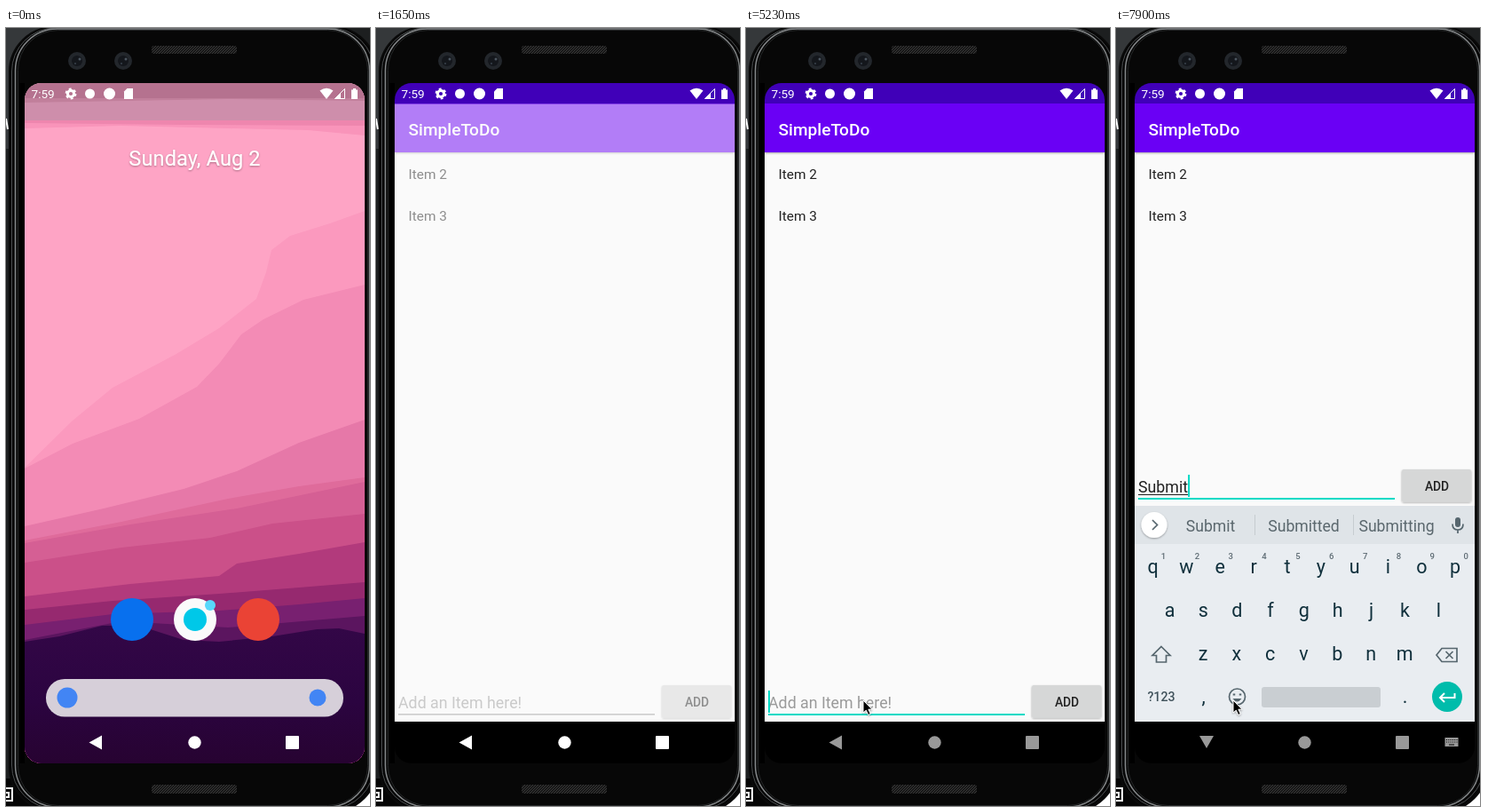
These frames come from a looping animation (410 px wide and 876 px high, 8 s). An HTML page:

```html
<!DOCTYPE html>
<html lang="en">
<head>
<meta charset="utf-8">
<title>To-do app demo</title>
<style>
  html, body { margin: 0; width: 100%; height: 100%; overflow: hidden; background: #000; }
  svg { display: block; width: 410px; height: 876px; }
  text { font-family: Roboto, sans-serif; }
  .mid { text-anchor: middle; }
  .key { font-size: 21.5px; fill: #10303c; }
  .num { font-size: 9.5px; fill: #5d6b73; font-weight: 500; }
  .item { font-size: 15.4px; fill: #212121; }
  .word { font-size: 17.6px; fill: #5a676d; }
  .field { font-size: 17.8px; }
  .line { fill: none; stroke: #56666e; stroke-width: 1.7; }
</style>
</head>
<body>
<svg viewBox="0 0 410 876">
  <defs>
    <clipPath id="screen"><rect x="21" y="62" width="383" height="766" rx="19"/></clipPath>
    <clipPath id="page"><rect x="21" y="85" width="383" height="696"/></clipPath>
    <pattern id="mesh" width="3" height="3" patternUnits="userSpaceOnUse">
      <rect width="3" height="3" fill="#151515"/><path d="M0 3 3 0" stroke="#3a3a3a"/>
    </pattern>
    <linearGradient id="night" x2="0" y2="1">
      <stop stop-color="#330747"/><stop offset=".55" stop-color="#2b0440"/><stop offset="1" stop-color="#270331"/>
    </linearGradient>
    <filter id="soft" x="-20%" y="-40%" width="140%" height="190%">
      <feDropShadow dx="0" dy="1" stdDeviation="1" flood-opacity=".35"/>
    </filter>
  </defs>

  <!-- desktop edge and phone body -->
  <rect width="410" height="876" fill="#1d1f20"/>
  <path d="M0 0H60V60L4 136H0Z" fill="#35383a"/>
  <path d="M0 102 2 114" stroke="#fff" stroke-width="2"/>
  <path d="M0 845H60V876H0Z" fill="#050505"/>
  <path d="M390 855H410V876H390Z" fill="#fff"/>
  <path d="M0 856H7V870H0M0 861H3V866H0" fill="none" stroke="#fff" stroke-width="2"/>
  <rect x="4" y="-1" width="414" height="883" rx="50" fill="#060606" stroke="#0a0a0a" stroke-width="2"/>
  <rect x="6.500" y="0" width="408" height="879" rx="49" fill="none" stroke="#4c4f51"/>
  <rect x="10.500" y="1" width="399" height="876" rx="47" fill="#090909" stroke="#85888a" stroke-width="1.500"/>
  <rect x="13.500" y="2.500" width="394" height="873" rx="45" fill="#070707" stroke="#252728"/>
  <path d="M15.500 62H21V828H15.500Z" fill="#000"/>
  <g id="lenses"></g>
  <rect x="164" y="20" width="96" height="9" rx="3" fill="url(#mesh)"/>
  <rect x="164" y="852" width="96" height="10" rx="3" fill="url(#mesh)"/>

  <g clip-path="url(#screen)">
    <g id="home">
      <rect x="21" y="62" width="383" height="766" fill="#fea4c5"/>
      <g id="hills"></g>
      <path d="M21 104H404V121L340 115 250 113 130 110 21 113Z" fill="#f994ba"/>
      <path d="M21 104H404V110L200 109 21 107Z" fill="#ee86ae"/>
      <rect x="21" y="62" width="383" height="42" fill="#ce8eab"/>
      <rect x="21" y="62" width="383" height="17" fill="#b5728f"/>
      <path d="M21 79H404V82L250 80 21 84Z" fill="#c17f9b"/>
      <text class="mid" x="212.500" y="154.500" font-size="23.6" letter-spacing=".1" fill="#fff" filter="url(#soft)">Sunday, Aug 2</text>
      <circle cx="142" cy="666" r="24" fill="#0870ee"/>
      <circle cx="213" cy="666" r="24" fill="#fafafa"/>
      <circle cx="213" cy="666" r="13" fill="#00c8e8"/>
      <circle cx="230" cy="650" r="6" fill="#58d8fb"/>
      <circle cx="284" cy="666" r="24" fill="#ea4335"/>
      <rect x="45" y="733" width="335" height="42.500" rx="21" fill="#d6cfd9"/>
      <circle cx="69" cy="754" r="11.500" fill="#4285f4"/>
      <circle cx="351" cy="754" r="9.500" fill="#4285f4"/>
    </g>

    <g id="launch">
      <rect x="36" y="113" width="353" height="643" fill="#fafafa" opacity=".79"/>
      <rect x="36" y="92" width="353" height="21" fill="#5e00b8"/>
      <rect x="36" y="756" width="353" height="42" opacity=".79"/>
    </g>

    <g id="app">
      <rect x="21" y="62" width="383" height="766"/>
      <rect x="21" y="85" width="383" height="696" fill="#fafafa"/>
      <rect x="21" y="62" width="383" height="23.500" fill="#4000b8"/>
      <g id="content" clip-path="url(#page)">
        <rect x="21" y="85" width="383" height="55" fill="#6b00f5" filter="url(#soft)"/>
        <text x="36.500" y="120.500" font-size="19.1" font-weight="500" fill="#fff">SimpleToDo</text>
        <text class="item" x="36.500" y="169.500">Item 2</text>
        <text class="item" x="36.500" y="216.500">Item 3</text>
        <g id="entry">
          <text id="hint" class="field" x="25" y="765.500" fill="#9a9a9a">Add an Item here!</text>
          <text id="typed" class="field" x="25" y="765.500" fill="#212121"></text>
          <rect id="under" x="25" y="768" height="1" fill="#212121"/>
          <rect id="rule" x="25" width="289"/>
          <rect id="caret" y="746" width="2" height="25" fill="#03dac5"/>
          <rect x="322" y="740" width="78" height="36.500" rx="2" fill="#d6d7d7" filter="url(#soft)"/>
          <text class="mid" x="361.500" y="763.500" font-size="13.8" font-weight="500" fill="#212121">ADD</text>
        </g>
        <g id="board">
          <rect x="21" y="538" width="383" height="243" fill="#e9edf1"/>
          <rect x="21" y="538" width="383" height="43" fill="#dfe4e8"/>
          <circle cx="43" cy="559.500" r="14.500" fill="#fff" filter="url(#soft)"/>
          <path id="chevron" class="line"/>
          <g id="tools">
            <g class="line">
              <circle cx="93" cy="558" r="5.500"/><path d="M97 562 103 568" stroke-width="2.300"/>
              <path d="M143 552.500H157V562L152 567H143ZM152 567V562H157M147 556V558M153 556V558M147 561Q149 563 151 561"/>
            </g>
            <text class="mid" x="205" y="564.500" font-size="13.5" font-weight="700" fill="#56666e">GIF</text>
            <rect x="254" y="552" width="16" height="16" rx="1" fill="#56666e"/>
            <path d="M296.500 548V571" stroke="#c6ccd0"/>
            <path d="M324.500 560H339" stroke="#56666e" stroke-width="4" stroke-linecap="round" stroke-dasharray="0 6.500"/>
          </g>
          <g id="words">
            <path d="M156.500 548V571M267.500 548V571" stroke="#c6ccd0"/>
            <text class="word mid" x="106.500" y="566.500"></text>
            <text class="word mid" x="211.500" y="566.500"></text>
            <text class="word mid" x="316" y="566.500"></text>
          </g>
          <rect x="382" y="551" width="6" height="11" rx="3" fill="#56666e"/>
          <path class="line" d="M379 558.500Q379 565 385 565T391 558.500M385 565V569"/>
          <g id="keys"></g>
          <path class="line" d="M51 696.500 61 706.500H56.500V714H45.500V706.500H41Z"/>
          <path class="line" d="M361 706 367 698.500H384V713.500H367ZM371.500 702 379.500 710M379.500 702 371.500 710"/>
          <text class="mid" x="51" y="758" font-size="14.2" font-weight="500" fill="#41535c">?123</text>
          <text class="key mid" x="98.500" y="760">,</text>
          <text class="key mid" x="325.500" y="760">.</text>
          <circle class="line" cx="136.500" cy="753" r="9"/>
          <path d="M133 749.500V751.500M140 749.500V751.500" stroke="#56666e" stroke-width="2.500"/>
          <path d="M131.500 755H141.500Q136.500 762 131.500 755" fill="#56666e"/>
          <rect x="164" y="742" width="134" height="23" rx="3" fill="#c9ced2"/>
          <circle cx="373" cy="753" r="17" fill="#00bcab"/>
          <path d="M381.500 749V754H365.500M370 749 365 754 370 759" fill="none" stroke="#fff" stroke-width="2"/>
        </g>
      </g>
    </g>

    <!-- status icons -->
    <g fill="#fff">
      <text x="28.500" y="79" font-size="13.6">7:59</text>
      <circle cx="73" cy="74" r="5.300" stroke="#fff" stroke-width="2.200" stroke-dasharray="2.775 2.775" fill="none"/>
      <circle cx="73" cy="74" r="3.600" fill="none" stroke="#fff" stroke-width="3"/>
      <circle cx="94.500" cy="74" r="5.500"/>
      <circle cx="116.500" cy="74" r="6.500"/>
      <path d="M136.500 68H143V80H133V71.500Z"/>
      <path d="M353.500 70.500Q361 65 368.500 70.500L361 80Z"/>
      <path d="M381.500 68.500V79.500H370.500Z" fill="none" stroke="#fff"/><path d="M377 73V80H370Z"/>
      <path d="M389 69.500H391V68H394V69.500H396V80H389Z"/>
    </g>

    <g id="nav" fill="#fff">
      <path id="back" d="M93.500 804.500 108 796.500V812.500Z"/>
      <circle cx="212.500" cy="804.500" r="7.200"/>
      <rect x="315" y="797" width="15" height="15" rx="1"/>
      <g id="switch">
        <path id="down" d="M94 797H110L102 811Z"/>
        <path d="M370.500 799H385.500V809H370.500Z"/>
        <path d="M372 801.500H384.500M372 804H384.500" stroke="#000" stroke-width="1" stroke-dasharray="1 1.300"/>
        <path d="M375 807H381" stroke="#000"/>
      </g>
    </g>
  </g>

  <path id="mouse" d="M0 0V14L3.300 11.200 5.700 16.500 8.300 15.300 5.900 10.200H10Z" stroke="#fff" stroke-width="1" filter="url(#soft)"/>
</svg>

<script>
const $ = id => document.getElementById(id);
const show = (id, on) => { $(id).style.display = on ? '' : 'none'; };
const set = (id, name, value) => $(id).setAttribute(name, value);

$('lenses').innerHTML = [80, 132].map(x =>
  `<circle cx="${x}" cy="37" r="10" fill="#23272c"/><circle cx="${x}" cy="37" r="6" fill="#14171c"/>
   <circle cx="${x + 3}" cy="35" r="1.500" fill="#4c5660"/><circle cx="${x - 2}" cy="40" r="1" fill="#39434c"/>`).join('');

// Wallpaper bands: colour and upper edge, back to front
const hills = [
  ['#fb99be', '21 495 75 442 120 405 190 368 240 338 282 305 293 275 299 250 320 234 365 220 404 206'],
  ['#f38bb5', '21 496 75 468 150 440 215 404 240 378 265 345 290 328 335 306 404 289'],
  ['#e678a8', '21 561 110 541 200 519 260 499 330 467 404 441'],
  ['#df6b9b', '21 577 130 556 250 530 330 516 404 506'],
  ['#d55f94', '21 580 140 559 260 541 404 511'],
  ['#cb5089', '21 602 130 585 230 574 300 558 404 547'],
  ['#b23a7c', '21 640 140 626 240 617 260 603 330 592 404 579'],
  ['#96296f', '21 655 120 645 240 637 330 630 404 624'],
  ['#782070', '21 672 120 660 240 656 330 649 404 642'],
  ['#5b155f', '21 689 130 668 250 675 404 662'],
  ['url(#night)', '21 691 60 685 108 673 150 673 200 689 240 691 300 685 350 677 375 676 404 682']
];
$('hills').innerHTML = hills.map(([fill, edge]) =>
  `<path d="M${edge} 404 828 21 828Z" fill="${fill}"/>`).join('');

const rows = [['qwertyuiop', 41.5, 613.5], ['asdfghjkl', 60.5, 662.5], ['zxcvbnm', 98, 711.5]];
$('keys').innerHTML = rows.map(([letters, x0, y], row) => [...letters].map((c, i) => {
  const x = x0 + i * 37.85;
  const digit = row ? '' : `<text class="num mid" x="${x + 12}" y="598">${(i + 1) % 10}</text>`;
  return `<text class="key mid" x="${x}" y="${y}">${c}</text>${digit}`;
}).join('')).join('');

// Each track: [start ms, value], held until the next entry
const tracks = {
  content: [[0, 0], [1650, .5], [1800, 1]],
  nav: [[0, 1], [2100, .88], [2250, .77], [2400, .72], [2540, .67], [2690, .63], [2840, .6]],
  mouse: [[0, null], [2400, [7, 330]], [2540, [42, 230]], [2690, [72, 180]], [2840, [82, 166]],
    [3740, [117, 514]], [3890, [125, 650]], [4040, [130, 730]], [4180, [132, 753]], [4330, [132, 757]]],
  board: [[0, null], [5380, 150], [5530, 40], [5670, 0]],
  caret: [[0, 0], [5230, 1], [5820, 0], [6420, 1]],
  typed: [[0, ''], [6710, 'S'], [6860, 'Su'], [7160, 'Sub'], [7460, 'Subm'], [7750, 'Submi'], [7900, 'Submit']]
};
const guesses = {
  S: ['S', 'So', 'She'],
  Su: ['Su', 'Sure', 'Sunday'],
  Sub: ['Sub', 'Subway', 'Submitted'],
  Subm: ['Subm', 'Submit', 'Submitted'],
  Submi: ['Submi', 'Submit', 'Submitting'],
  Submit: ['Submit', 'Submitted', 'Submitting']
};
const at = (name, t) => tracks[name].filter(step => step[0] <= t).pop()[1];

function draw(t) {
  show('home', t < 1350);
  show('launch', t >= 1200 && t < 1350);
  show('app', t >= 1350);
  set('content', 'opacity', at('content', t));
  set('nav', 'fill-opacity', at('nav', t));

  const mouse = at('mouse', t);
  show('mouse', mouse);
  if (mouse) set('mouse', 'transform', `translate(${mouse})`);

  const focused = t >= 5230;
  const slide = at('board', t);
  const open = slide !== null;
  show('board', open);
  show('switch', open);
  show('back', !open);
  set('board', 'transform', `translate(0 ${slide || 0})`);
  set('entry', 'transform', `translate(0 ${open ? -243 : 0})`);
  set('rule', 'y', focused ? 772 : 772.2);
  set('rule', 'height', focused ? 2 : 1.3);
  set('rule', 'fill', focused ? '#03dac5' : '#8a8a8a');

  const text = at('typed', t);
  $('typed').textContent = text;
  const width = text ? $('typed').getComputedTextLength() : 0;
  set('under', 'width', width);
  set('caret', 'x', 25 + width);
  show('caret', at('caret', t));
  show('hint', !text);
  show('tools', !text);
  show('words', text);
  set('chevron', 'd', text ? 'M41 554 46.500 559.500 41 565' : 'M46 554 40.500 559.500 46 565');
  const words = guesses[text] || [];
  $('words').querySelectorAll('text').forEach((el, i) => { el.textContent = words[i] || ''; });
}

function tick() {
  draw(performance.now() % 8000);
  requestAnimationFrame(tick);
}
tick();
</script>
</body>
</html>
```
